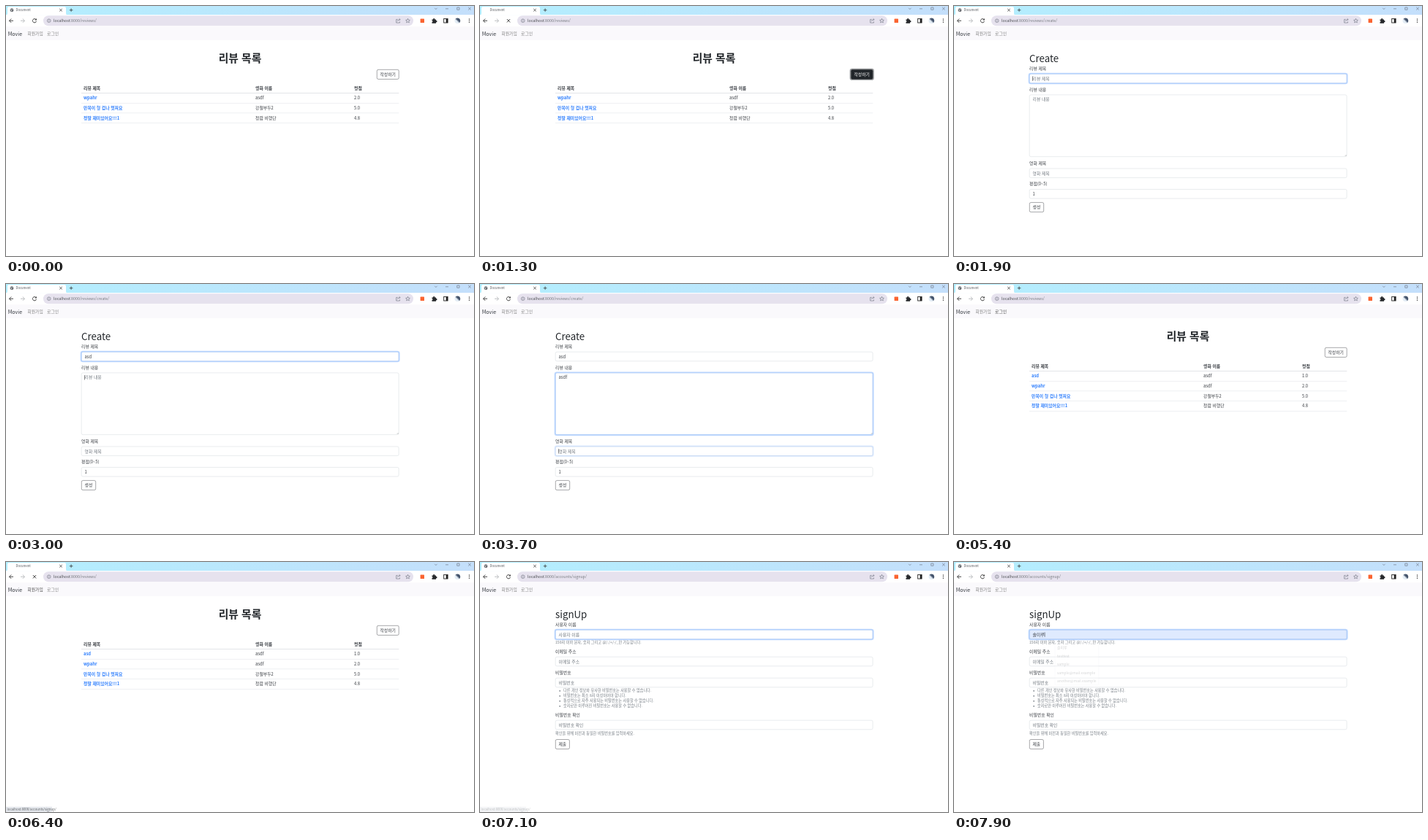
Animation of 640x343 px, one loop 8 s. Source, as an HTML page:

```html
<!DOCTYPE html>
<html lang="ko">
<head>
<meta charset="utf-8">
<title>Movie reviews</title>
<style>
  html, body { margin: 0; width: 100%; height: 100%; overflow: hidden; background: #fff; }
  svg { display: block; width: 100vw; height: 100vh; }
  text { font-family: "Noto Sans CJK KR", "Noto Sans CJK", "Noto Sans", sans-serif; white-space: pre; }
  .line { fill: none; stroke: #333; stroke-width: .9; }
  .thin { fill: none; stroke: #666b78; stroke-width: .6; }
</style>
</head>
<body>
<svg id="stage" viewBox="0 0 640 343" preserveAspectRatio="none"></svg>
<script>
const LOOP = 8000;
const INK = '#212529', BODY = '#383c42', MUTED = '#737a82', LINK = '#2f7ffd', NAV = '#808080';
const LEFT = 103, RIGHT = 537.3;

// Text is placed by its optical middle.
const text = (x, y, str, { size = 5.85, fill = BODY, bold = false, anchor = 'start' } = {}) =>
  `<text x="${x}" y="${y + size * .36}" font-size="${size}" fill="${fill}" text-anchor="${anchor}"` +
  ` font-weight="${bold ? 700 : 400}">${str}</text>`;
const rect = (x, y, w, h, fill, attrs = '') =>
  `<rect x="${x}" y="${y}" width="${w}" height="${h}" fill="${fill}" ${attrs}/>`;
const path = (d, attrs = 'class="line"') => `<path d="${d}" ${attrs}/>`;
const rule = (y, color) => rect(LEFT, y - .25, RIGHT - LEFT, .5, color);
const show = (spans, ...parts) => `<g data-show="${spans}">${parts.join('')}</g>`;
const heading = (str) => text(LEFT, 72.4, str, { size: 13.3, fill: INK });
const small = (x, y, str) => text(x, y, str, { size: 5.15, fill: MUTED });

function button(x, y, w, label, mode = '') {
  const active = mode !== '';
  const ring = mode === 'press'
    ? rect(x - .6, y - .6, w + 1.2, 14.7, 'none', 'rx="2.4" stroke="#212529" stroke-opacity=".45" stroke-width="1.5"') : '';
  return ring + rect(x + .3, y + .3, w - .6, 13.1, active ? INK : '#fff', 'rx="1.9" stroke="#212529" stroke-width=".4"') +
    text(x + w / 2, y + 7, label, { fill: active ? '#fff' : BODY, anchor: 'middle' });
}

const field = (y, h = 13, fill = '#fff') =>
  rect(LEFT + .2, y + .2, RIGHT - LEFT - .4, h - .4, fill, 'rx="2" stroke="#ced4da" stroke-width=".45"');
const labelled = (y, label, h) => text(LEFT, y - 7, label) + field(y, h);
const value = (y, str) => text(107.5, y + 6.6, str);
const hint = (y, str) => text(107.5, y + 6.6, str, { fill: MUTED });
const caret = (x, y) => rect(x, y + 3.4, .5, 6.4, '#111');

function focus(y, h, start, end) {
  const ring = (opacity) => `<g opacity="${opacity}">` +
    rect(LEFT - .6, y - .6, RIGHT - LEFT + 1.2, h + 1.2, 'none', 'rx="2.6" stroke="#bfd8fe" stroke-width="1.4"') +
    rect(LEFT + .2, y + .2, RIGHT - LEFT - .4, h - .4, 'none', 'rx="2" stroke="#86b7fe" stroke-width=".5"') + '</g>';
  return show(`${start}-${start + 100}`, ring(.5)) + show(`${start + 100}-${end}`, ring(1));
}

// Successive contents of a field: [start time, string, caret x].
const typing = (y, end, steps) => steps.map(([start, str, x], i) =>
  show(`${start}-${i + 1 < steps.length ? steps[i + 1][0] : end}`, value(y, str), x ? caret(x, y) : '')).join('');

function browser() {
  const loading = '1300-1400 4500-4600 6400-6600';
  const idle = '0-1300 1400-4500 4600-6400 6600-8000';
  const url = (page) => text(65, 20, `localhost<tspan fill="#777b80">:8000/${page}/</tspan>`, { size: 5.3, fill: '#45484c' });
  return `<defs>
    <linearGradient id="bar"><stop stop-color="#b2effe"/><stop offset="1" stop-color="#c4dffb"/></linearGradient>
    <linearGradient id="avatar" y1="1" x2="1" y2="0"><stop offset=".4" stop-color="#e4edf5"/><stop offset=".6" stop-color="#43536b"/></linearGradient>
  </defs>` +
  rect(0, 0, 640, 12.3, 'url(#bar)') +
  path('M0 12.3Q2 12.3 2 10V3Q2 1 4 1H80Q82 1 82 3V10Q82 12.3 84 12.3Z', 'fill="#fff"') +
  rect(0, 12.2, 640, 16, '#fff') +
  show(idle, '<circle cx="8" cy="5.7" r="2.4" fill="#5f6368"/>',
    path('M6.4 4.8L8 5.8L7.3 7.4M8.3 3.8L9.7 5.2', 'fill="none" stroke="#fff" stroke-width=".7"')) +
  text(13.5, 5.6, 'Document', { size: 4.2, fill: '#55585d' }) +
  path('M73.2 3.8l3.6 3.6m0-3.6l-3.6 3.6M86.8 5.6h4.6m-2.3-2.3v4.6', 'fill="none" stroke="#333" stroke-width=".75"') +
  path('M586.2 2.8l1.7 1.7l1.7-1.7M601 3.8h4M616.8 2h3.2v3.2h-3.2zM632.2 1.8l3.6 3.6m0-3.6l-3.6 3.6', 'class="thin"') +
  path('M10 20.2H4.5m2.7-2.7l-2.7 2.7l2.7 2.7') +
  path('M20 20.2h5.5m-2.7-2.7l2.7 2.7l-2.7 2.7', 'fill="none" stroke="#b5b7ba" stroke-width=".9"') +
  show(idle, path('M41.1 18.7A2.6 2.6 0 1 0 41.5 20.9'), path('M41.8 17v2.5h-2.5z', 'fill="#333"')) +
  show(loading, path('M36.8 18l4.4 4.4m0-4.4l-4.4 4.4')) +
  rect(51, 13.2, 506, 14, '#e6e2ee', 'rx="7"') +
  '<circle cx="58.7" cy="20.2" r="2.3" class="thin"/>' + path('M58.7 19.8v1.6M58.7 18.7v.6', 'class="thin"') +
  show('0-1400 4600-6500', url('reviews')) +
  show('1400-4600', url('reviews/create')) +
  show('6500-8000', url('accounts/signup')) +
  path('M535.7 18.4h-2v4.6h4.8v-1.6M535.4 21q.3-2.5 3.6-2.5m-1.4-1.4l1.5 1.4l-1.5 1.5', 'class="thin"') +
  path('M549.5 17.3l.85 1.9l2.05.2l-1.55 1.4l.45 2l-1.8-1.05l-1.8 1.05l.45-2l-1.55-1.4l2.05-.2z', 'class="thin"') +
  rect(566.6, 17.6, 5.4, 5.4, '#fa6431', 'rx=".6"') +
  path('M582.5 18.5h1.7a1.1 1.1 0 1 1 2.1 0h1.8v1.6a1.1 1.1 0 1 1 0 2.1v1.5h-5.6v-1.7a1 1 0 1 0 0-2z', 'fill="#26282b"') +
  rect(598.7, 17.4, 5.4, 5.6, '#fff', 'stroke="#222" stroke-width=".9"') + rect(601.7, 17.4, 2.4, 5.6, '#222') +
  '<circle cx="617.4" cy="20.2" r="3.8" fill="url(#avatar)"/>' +
  [18, 20.2, 22.4].map(y => `<circle cx="633.5" cy="${y}" r=".65" fill="#333"/>`).join('');
}

function navbar() {
  const link = (x, label, [from, to]) =>
    show(`0-${from} ${to}-8000`, text(x, 38, label, { fill: NAV })) +
    show(`${from}-${to}`, text(x, 38, label, { fill: '#4a4a4a' }));
  return rect(0, 28.2, 640, 18.8, '#faf9fc') + text(2.7, 38.3, 'Movie', { size: 7 }) +
    link(29.3, '회원가입', [5800, 6800]) + link(56, '로그인', [5200, 5800]);
}

function listPage() {
  const rows = [
    ['wpahr', 'asdf', '2.0'],
    ['만복이 형 겁나 멋져요', '강철부두2', '5.0'],
    ['정말 재미있어요!!!1', '청람 비행단', '4.8']
  ];
  const cells = (y, [title, movie, score], fill, bold) =>
    text(106, y, title, { bold: true, fill }) + text(341, y, movie, { bold }) + text(476, y, score, { bold });
  const table = (data) => data.map((row, i) => {
    const y = 126.2 + i * 13.7;
    return cells(y, row, LINK, false) + rule(y + 7, '#dde0e6');
  }).join('');
  const write = (mode) => button(507, 87, 30.5, '작성하기', mode);
  return show('0-1400 4600-6500',
    text(320, 72, '리뷰 목록', { size: 14.8, fill: INK, bold: true, anchor: 'middle' }),
    cells(112.5, ['리뷰 제목', '영화 이름', '평점'], BODY, true), rule(119.5, '#c6c9d0'),
    show('0-1400', table(rows)),
    show('4600-6500', table([['asd', 'asdf', '1.0'], ...rows])),
    show('0-1100 4600-6500', write()),
    show('1100-1200', write('hover')),
    show('1200-1400', write('press')));
}

function createPage() {
  const submit = (mode) => button(103, 269.3, 20, '생성', mode);
  return show('1400-4600', heading('Create'),
    labelled(93, '리뷰 제목'), labelled(121.7, '리뷰 내용', 85.2),
    labelled(222.8, '영화 제목'), labelled(251.3, '평점(0~5)'),
    path('M534.6 206l2-2m-.8 2l.8-.8', 'fill="none" stroke="#888" stroke-width=".4"'),
    focus(93, 13, 1800, 3100), focus(121.7, 85.2, 3100, 3800), focus(222.8, 13, 3700, 4400),
    show('1400-2600', hint(93, '리뷰 제목')),
    show('1900-2200', caret(107.3, 93)),
    typing(93, 4600, [[2600, 'asd', 116.2], [3000, 'asd']]),
    show('1400-3200', hint(121.7, '리뷰 내용')),
    show('3000-3200', caret(107.3, 121.7)),
    typing(121.7, 4600, [[3200, 'as', 113], [3300, 'asdf', 118], [3700, 'asdf']]),
    show('1400-3900', hint(222.8, '영화 제목')),
    show('3700-3900', caret(107.3, 222.8)),
    typing(222.8, 4600, [[3900, 'a', 110.6], [4000, 'asd', 116.2], [4100, 'asdf', 118], [4300, 'asdf']]),
    value(251.3, '1'),
    show('1400-4300', submit()), show('4300-4400', submit('hover')), show('4400-4600', submit('press')));
}

function suggestionList() {
  const items = ['솔미루', 'testtest', 'sample', 'sample@mail.example', 'another@mail.example'];
  const panel = (opacity) => `<g opacity="${opacity}">` +
    rect(138, 111, 60, 58, '#fff', 'rx="1.5" stroke="#d5d7dc" stroke-width=".5"') +
    items.map((str, i) => text(141, 117.2 + i * 11.6, str, { size: 4.9 })).join('') + '</g>';
  return show('7400-7800', panel(1)) + show('7800-7900', panel(.6)) + show('7900-8000', panel(.2));
}

function signupPage() {
  const rules = [
    '다른 개인 정보와 유사한 비밀번호는 사용할 수 없습니다.',
    '비밀번호는 최소 8자 이상이어야 합니다.',
    '통상적으로 자주 사용되는 비밀번호는 사용할 수 없습니다.',
    '숫자로만 이루어진 비밀번호는 사용할 수 없습니다.'
  ];
  return show('6500-8000', heading('signUp'),
    labelled(93, '사용자 이름'), small(LEFT, 110.6, '150자 이하 문자, 숫자 그리고 @/./+/-/_만 가능합니다.'),
    labelled(130, '이메일 주소'), hint(130, '이메일 주소'),
    labelled(159, '비밀번호'), hint(159, '비밀번호'),
    ...rules.map((str, i) => `<circle cx="109.2" cy="${176.8 + i * 7}" r=".9" fill="${MUTED}"/>` + small(114, 176.6 + i * 7, str)),
    labelled(217, '비밀번호 확인'), hint(217, '비밀번호 확인'),
    small(LEFT, 235, '확인을 위해 이전과 동일한 비밀번호를 입력하세요.'),
    button(103, 243.2, 19.7, '제출'),
    show('7600-8000', field(93, 13, '#dfeafe')),
    focus(93, 13, 6900, 8000),
    show('6500-7600', hint(93, '사용자 이름')),
    typing(93, 8000, [[7600, '솔미루'], [7900, '솔미루', 123.8]]),
    suggestionList());
}

function statusBar() {
  const bubble = (page, opacity) => `<g opacity="${opacity}">` + rect(0, 335.8, 63, 7.2, '#e4e7ec') +
    text(1.5, 339.6, `localhost:8000/accounts/${page}/`, { size: 4.4, fill: '#5f6368' }) + '</g>';
  return show('5500-5600', bubble('login', .5)) + show('5600-5900', bubble('login', 1)) +
    show('5900-7000', bubble('signup', 1)) + show('7000-7100', bubble('signup', .7)) +
    show('7100-7200', bubble('signup', .4));
}

const stage = document.getElementById('stage');
stage.innerHTML = browser() + navbar() + listPage() + createPage() + signupPage() + statusBar();

const timed = [...stage.querySelectorAll('[data-show]')].map(node => ({
  node, spans: node.dataset.show.split(' ').map(span => span.split('-').map(Number))
}));

const origin = performance.now();
function render() {
  const t = (performance.now() - origin) % LOOP;
  for (const { node, spans } of timed) {
    node.style.display = spans.some(([from, to]) => t >= from && t < to) ? '' : 'none';
  }
  requestAnimationFrame(render);
}
render();
</script>
</body>
</html>
```
